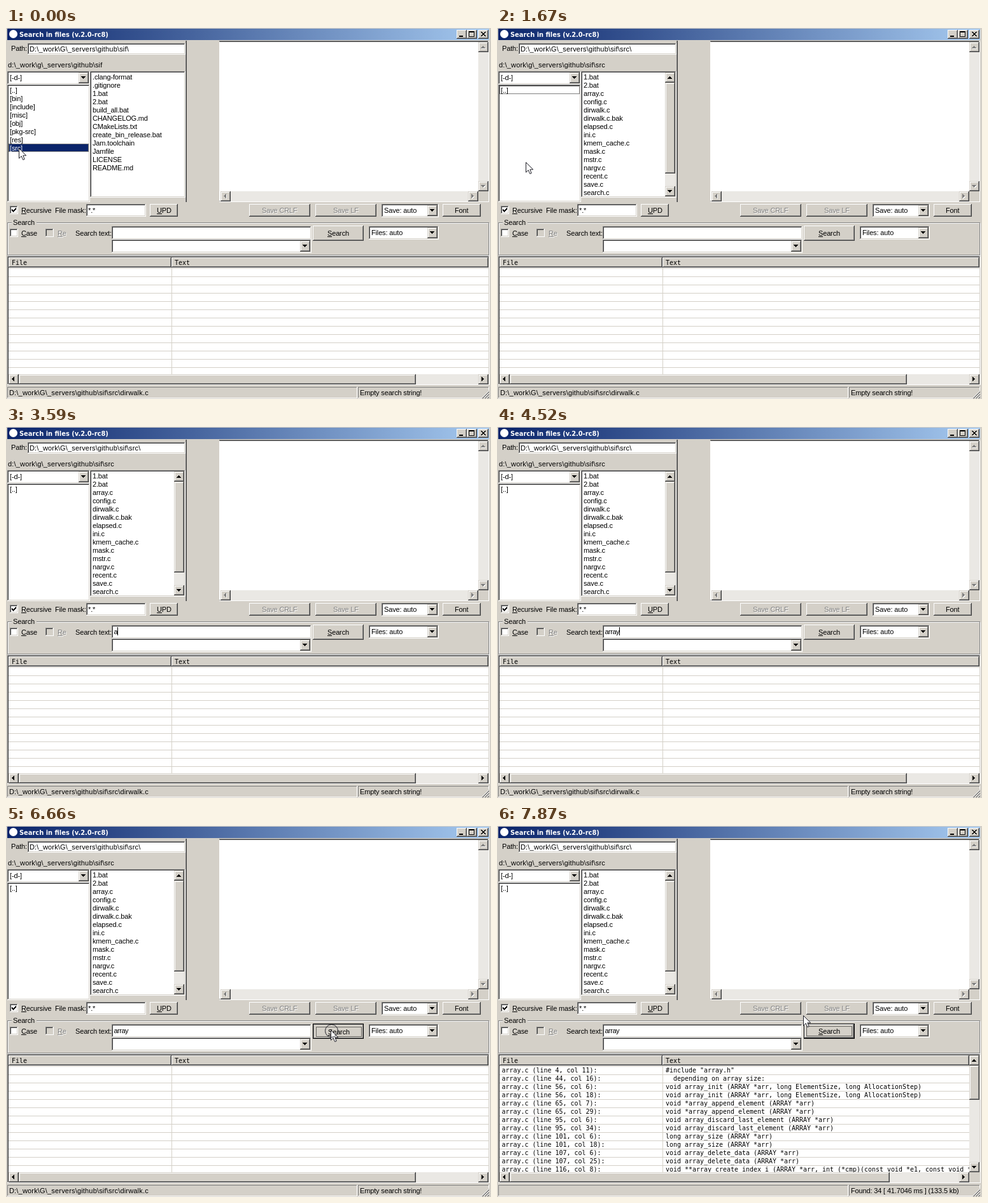
Write an HTML page with a canvas that moves like this. It is 762 px wide and 584 px high and loops after 7.99 s.

```html
<!DOCTYPE html>
<html lang="en">
<head>
<meta charset="utf-8">
<title>Search in files</title>
<style>
  html, body { margin: 0; width: 100%; height: 100%; overflow: hidden; background: #d4d0c8; }
  canvas { display: block; }
</style>
</head>
<body>
<canvas id="stage" width="762" height="584"></canvas>
<script>
const ctx = document.getElementById('stage').getContext('2d');
const LOOP = 7990;
const FACE = '#d4d0c8', SHADOW = '#808080', DARK = '#404040', WHITE = '#fff', TRACK = '#eae8e4', NAVY = '#0a246a';
const SANS = '11px "Liberation Sans", Arial, sans-serif';
const MONO = '9.97px "DejaVu Sans Mono", monospace';
const TITLE = 'bold 9.9px "DejaVu Sans", sans-serif';
const LABEL_SPACING = -0.15, PATH_SPACING = 0.18, INPUT_SPACING = -0.5;

// Edge colours: outer top-left, outer bottom-right, inner top-left, inner bottom-right
const RAISED = [WHITE, DARK, FACE, SHADOW];
const THUMB = [FACE, DARK, WHITE, SHADOW];
const SUNKEN = [SHADOW, WHITE, DARK, FACE];

const DIRS = '[..] [bin] [include] [misc] [obj] [pkg-src] [res] [src]'.split(' ');
const ROOT_FILES = ('.clang-format .gitignore 1.bat 2.bat build_all.bat CHANGELOG.md CMakeLists.txt ' +
  'create_bin_release.bat Jam.toolchain Jamfile LICENSE README.md').split(' ');
const SRC_FILES = ('1.bat 2.bat array.c config.c dirwalk.c dirwalk.c.bak elapsed.c ini.c kmem_cache.c ' +
  'mask.c mstr.c nargv.c recent.c save.c search.c').split(' ');
const RESULTS = [
  ['#include "array.h"', 4, 11],
  ['  depending on array size:', 44, 16],
  ['void array_init (ARRAY *arr, long ElementSize, long AllocationStep)', 56, 6, 18],
  ['void *array_append_element (ARRAY *arr)', 65, 7, 29],
  ['void array_discard_last_element (ARRAY *arr)', 95, 6, 34],
  ['long array_size (ARRAY *arr)', 101, 6, 18],
  ['void array_delete_data (ARRAY *arr)', 107, 6, 25],
  ['void **array_create_index_i (ARRAY *arr, int (*cmp)(const void *e1, const void *e2))', 116, 8],
].flatMap(([code, line, ...cols]) => cols.map(col => [`array.c (line ${line}, col ${col}):`, code]));

// Pointer path: time, x, y, shape
const POINTER = [
  [0, 20, 189, 'arrow'], [1670, 45, 211, 'arrow'], [1790, 92, 248, 'arrow'], [1910, 144, 293, 'beam'],
  [2060, 177, 324, 'beam'], [2210, 182, 327, 'beam'], [2360, 183, 327, 'beam'], [3590, 0, 0, 'none'],
  [5540, 205, 319, 'beam'], [5660, 275, 318, 'beam'], [5780, 349, 301, 'arrow'], [5900, 449, 306, 'arrow'],
  [6050, 495, 308, 'arrow'], [6200, 510, 321, 'arrow'], [7750, 500, 313, 'arrow'], [7870, 481, 298, 'arrow'],
];
const CLICKS = [[460, 610], [760, 910], [2670, 2820], [6660, 6970]];
const CARET = [[2670, 3130], [3590, 5140], [5540, 6050]];
const KEYS = [3590, 3870, 4120, 4240, 4520];

const within = (t, spans) => spans.some(([from, to]) => t >= from && t < to);

function rect(color, x, y, w, h) {
  ctx.fillStyle = color;
  ctx.fillRect(x, y, w, h);
}

function outline(x, y, w, h, topLeft, bottomRight) {
  rect(topLeft, x, y, w, 1);
  rect(topLeft, x, y, 1, h);
  rect(bottomRight, x, y + h - 1, w, 1);
  rect(bottomRight, x + w - 1, y, 1, h);
}

function box(fill, x, y, w, h, [a, b, c, d]) {
  rect(fill, x, y, w, h);
  outline(x, y, w, h, a, b);
  outline(x + 1, y + 1, w - 2, h - 2, c, d);
}

function dotted(x, y, w, h, color = '#000') {
  ctx.setLineDash([1, 1]);
  ctx.strokeStyle = color;
  ctx.lineWidth = 1;
  ctx.strokeRect(x + 0.5, y + 0.5, w - 1, h - 1);
  ctx.setLineDash([]);
}

// "&" marks the underlined letter
function text(s, x, y, { color = '#000', font = SANS, spacing = LABEL_SPACING, center = false } = {}) {
  ctx.font = font;
  ctx.letterSpacing = spacing + 'px';
  ctx.fillStyle = color;
  const plain = s.replace('&', ''), mark = s.indexOf('&');
  if (center) x = Math.round(x - ctx.measureText(plain).width / 2);
  ctx.fillText(plain, x, y);
  if (mark >= 0) {
    const start = ctx.measureText(s.slice(0, mark)).width;
    rect(color, Math.round(x + start), y + 1, Math.round(ctx.measureText(s[mark + 1]).width), 1);
  }
}

function monoText(s, x, y) {
  text(s, x, y, { font: MONO, spacing: 0 });
}

function disabledText(s, x, y, center) {
  text(s, x + 1, y + 1, { color: WHITE, center });
  text(s, x, y, { color: SHADOW, center });
}

function triangle(x, y, dir, color) {
  for (let i = 0; i < 4; i++) {
    const len = 7 - 2 * i;
    if (dir === 'down') rect(color, x - 3 + i, y - 2 + i, len, 1);
    if (dir === 'up') rect(color, x - 3 + i, y + 1 - i, len, 1);
    if (dir === 'right') rect(color, x - 2 + i, y - 3 + i, 1, len);
    if (dir === 'left') rect(color, x + 1 - i, y - 3 + i, 1, len);
  }
}

function arrowButton(x, y, dir, enabled = true, h = 16) {
  box(FACE, x, y, 16, h, THUMB);
  const sideways = dir === 'left' || dir === 'right';
  const cx = x + 7, cy = y + (sideways ? 7 : 8);
  if (!enabled) triangle(cx + 1, cy + 1, dir, WHITE);
  triangle(cx, cy, dir, enabled ? '#000' : SHADOW);
}

// Without a thumb length the bar is disabled
function scrollbar(x, y, length, vertical, thumb) {
  const enabled = thumb > 0;
  if (vertical) {
    rect(TRACK, x, y, 16, length);
    arrowButton(x, y, 'up', enabled);
    arrowButton(x, y + length - 16, 'down', enabled);
    if (enabled) box(FACE, x, y + 16, 16, thumb, THUMB);
  } else {
    rect(TRACK, x, y, length, 16);
    arrowButton(x, y, 'left', enabled);
    arrowButton(x + length - 16, y, 'right', enabled);
    if (enabled) box(FACE, x + 16, y, thumb, 16, THUMB);
  }
}

function button(label, x, y, w, h, enabled = true) {
  box(FACE, x, y, w, h, RAISED);
  const cx = x + w / 2, base = y + h / 2 + 4;
  if (enabled) text(label, cx, base, { center: true });
  else disabledText(label, cx, base, true);
}

function field(s, x, y, w, h, spacing) {
  box(WHITE, x, y, w, h, SUNKEN);
  text(s, x + 3, y + Math.floor(h / 2) + 4, { spacing });
}

function combo(s, x, y, w) {
  box(WHITE, x, y, w, 21, SUNKEN);
  text(s, x + 4, y + 14);
  arrowButton(x + w - 18, y + 2, 'down', true, 17);
}

function checkbox(x, y, checked, enabled = true) {
  box(enabled ? WHITE : FACE, x, y, 13, 13, SUNKEN);
  if (checked) for (let i = 0; i < 7; i++) rect('#000', x + 3 + i, y + 5 + (i < 3 ? i : 4 - i), 1, 3);
}

function list(items, x, y) {
  items.forEach((item, i) => text(item, x, y + 11 + 13 * i));
}

function titleBar() {
  const blue = ctx.createLinearGradient(2, 0, 759, 0);
  blue.addColorStop(0, NAVY);
  blue.addColorStop(1, '#a6caf0');
  rect(blue, 2, 1, 757, 18);
  ctx.fillStyle = WHITE;
  ctx.beginPath();
  ctx.arc(11.5, 9.5, 6.5, 0, 7);
  ctx.fill();
  text('Search in files (v.2.0-rc8)', 21, 14, { color: WHITE, font: TITLE, spacing: 0 });
  for (const x of [708, 724, 742]) box(FACE, x, 3, 16, 14, RAISED);
  rect('#000', 712, 12, 6, 2);
  outline(727, 5, 9, 9, '#000', '#000');
  rect('#000', 727, 5, 9, 2);
  for (let i = 0; i < 7; i++) {
    rect('#000', 746 + i, 6 + i, 2, 1);
    rect('#000', 752 - i, 6 + i, 2, 1);
  }
}

function browser(t) {
  const inSrc = t >= 760;
  const path = '\\_servers\\github\\sif' + (inSrc ? '\\src' : '');
  text('Path:', 8, 36);
  field('D:\\_work\\G' + path + '\\', 34, 24, 248, 18, PATH_SPACING);
  text('d:\\_work\\g' + path, 3, 62, { spacing: PATH_SPACING });
  rect(SHADOW, 282, 20, 1, 254);
  rect(DARK, 283, 20, 1, 254);
  combo('[-d-]', 2, 68, 130);

  box(WHITE, 2, 89, 130, 185, SUNKEN);
  list(inSrc ? DIRS.slice(0, 1) : DIRS, 6, 91);
  if (!inSrc) {
    rect(NAVY, 4, 182, 126, 13);
    dotted(4, 182, 126, 13, '#f5db95');
    text('[src]', 6, 193, { color: WHITE });
  } else if (t < 2670) dotted(4, 91, 126, 13);

  box(WHITE, 132, 68, 150, 199, SUNKEN);
  list(inSrc ? SRC_FILES : ROOT_FILES, 136, 70);
  if (inSrc) scrollbar(264, 70, 195, true, 143);
}

function editor() {
  box(WHITE, 335, 20, 424, 254, SUNKEN);
  rect(WHITE, 335, 22, 2, 250);
  scrollbar(742, 22, 235, true);
  scrollbar(337, 257, 405, false);
  rect(FACE, 742, 257, 16, 16);
}

function optionsRow() {
  checkbox(6, 280, true);
  text('&Recursive', 24, 291);
  text('File mask:', 77, 291);
  field('*.*', 126, 277, 94, 20);
  button('&UPD', 226, 277, 44, 20);
  button('Save CRLF', 382, 277, 96, 20, false);
  button('Save LF', 486, 277, 96, 20, false);
  combo('Save: auto', 590, 277, 90);
  button('Font', 686, 277, 60, 20);
}

function searchButton(t) {
  const x = 482, y = 311, w = 80, h = 24;
  if (t < 6660) return button('&Search', x, y, w, h);
  const shift = t < 6970 ? 1 : 0;
  if (shift) {
    rect(FACE, x, y, w, h);
    outline(x + 1, y + 1, w - 2, h - 2, SHADOW, SHADOW);
  } else box(FACE, x + 1, y + 1, w - 2, h - 2, RAISED);
  outline(x, y, w, h, '#000', '#000');
  text('&Search', x + w / 2 + shift, y + h / 2 + 4 + shift, { center: true });
  dotted(x + 4 + shift, y + 4 + shift, w - 8, h - 8);
}

function searchGroup(t) {
  outline(3, 307, 757, 52, WHITE, WHITE);
  outline(2, 306, 757, 52, SHADOW, SHADOW);
  rect(FACE, 9, 305, 39, 4);
  text('Search', 11, 310);
  checkbox(6, 316);
  text('&Case', 24, 327);
  checkbox(62, 316, false, false);
  disabledText('&Re', 81, 327);
  text('Search text:', 109, 327);

  const typed = 'array'.slice(0, KEYS.filter(k => t >= k).length);
  box(WHITE, 166, 312, 314, 21, SUNKEN);
  text(typed, 169.5, 326, { spacing: INPUT_SPACING });
  if (within(t, CARET)) rect('#000', Math.round(169 + ctx.measureText(typed).width), 315, 1, 13);

  combo('', 166, 333, 314);
  searchButton(t);
  combo('Files: auto', 570, 312, 110);
}

function table(found) {
  const right = found ? 742 : 758;
  box(WHITE, 2, 359, 758, 203, SUNKEN);
  for (let y = 378; y < 545; y += 13) rect(FACE, 4, y, right - 4, 1);
  rect(FACE, 260, 376, 1, 169);
  for (const [label, x, end] of [['File', 4, 260], ['Text', 260, right]]) {
    box(FACE, x, 361, end - x, 16, RAISED);
    monoText(label, x + 5, 373);
  }
  if (found) {
    ctx.save();
    ctx.beginPath();
    ctx.rect(4, 377, right - 4, 168);
    ctx.clip();
    RESULTS.forEach(([place, code], i) => {
      monoText(place, 7.5, 388 + 13 * i);
      monoText(code, 265, 388 + 13 * i);
    });
    ctx.restore();
    scrollbar(742, 361, 184, true, 54);
    rect(FACE, 742, 545, 16, 16);
  }
  scrollbar(4, 545, right - 4, false, found ? 597 : 624);
}

function statusBar(found) {
  outline(2, 565, 550, 18, SHADOW, WHITE);
  outline(553, 565, 206, 18, SHADOW, WHITE);
  if (!found) text('D:\\_work\\G\\_servers\\github\\sif\\src\\dirwalk.c', 5, 578, { spacing: PATH_SPACING });
  text(found ? 'Found: 34 [ 41.7046 ms ] (133.5 kb)' : 'Empty search string!', 556, 578);
  rect(FACE, 747, 570, 12, 13);
  for (let i = 0; i < 12; i++) {
    const band = i % 4;
    if (band === 3) continue;
    for (let x = 747 + i; x < 759; x++) rect(band ? SHADOW : WHITE, x, 582 - (x - 747 - i), 1, 1);
  }
}

function pointer(t) {
  const [, x, y, shape] = POINTER.findLast(p => t >= p[0]);
  ctx.lineWidth = 1;
  ctx.strokeStyle = '#202028';
  if (shape === 'arrow') {
    const arrow = new Path2D('M.5 .5V16.2L4.2 12.7 6.7 18.5 9.2 17.5 6.8 11.8H11.7Z');
    ctx.save();
    ctx.translate(x, y);
    ctx.fillStyle = WHITE;
    ctx.fill(arrow);
    ctx.stroke(arrow);
    ctx.restore();
  } else if (shape === 'beam') {
    rect('#000', x, y - 7, 1, 14);
    for (const end of [y - 8, y + 7]) {
      rect('#000', x - 3, end, 3, 1);
      rect('#000', x + 1, end, 3, 1);
    }
  }
  if (within(t, CLICKS)) {
    const nudge = shape === 'arrow' ? 1.5 : 0;
    ctx.beginPath();
    ctx.arc(x + nudge, y + nudge, 10, 0, 7);
    ctx.stroke();
  }
}

const start = performance.now();

function draw() {
  const t = (performance.now() - start) % LOOP, found = t >= 6970;
  rect(FACE, 0, 0, 762, 584);
  titleBar();
  browser(t);
  editor();
  optionsRow();
  searchGroup(t);
  table(found);
  statusBar(found);
  pointer(t);
  requestAnimationFrame(draw);
}

draw();
</script>
</body>
</html>
```
